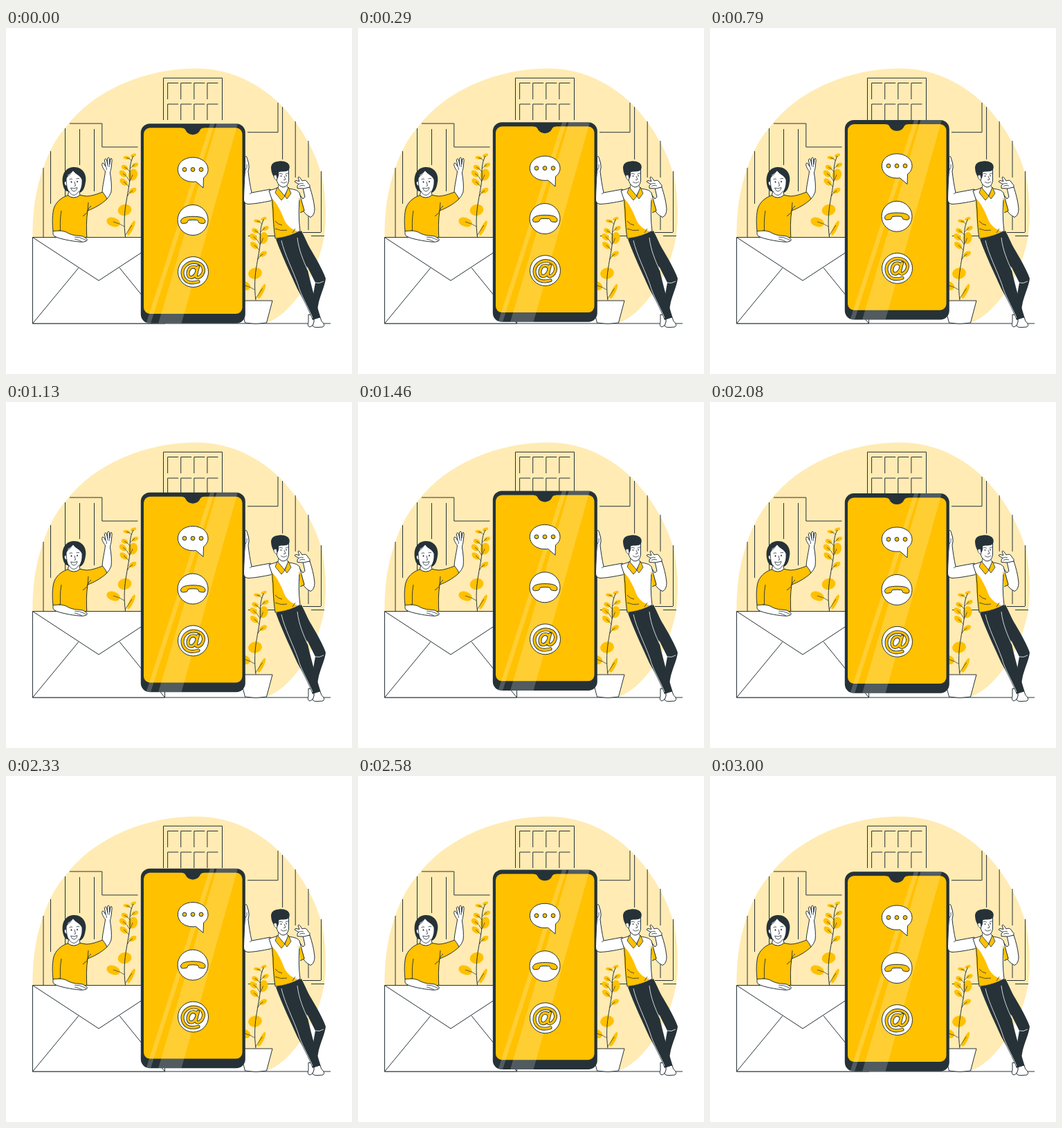
Recreate the animation shown at these times as an HTML page with a canvas. Size 500x500 px, loop 3.04 s.

```html
<!DOCTYPE html>
<html lang="en">
<head>
<meta charset="utf-8">
<title>Contact us</title>
<style>
html, body { margin: 0; width: 100%; height: 100%; overflow: hidden; background: #fff; }
canvas { display: block; width: 500px; height: 500px; }
</style>
</head>
<body>
<canvas id="stage"></canvas>
<script>
const INK = '#263238', SUN = '#ffc100', CREAM = '#ffebb3', WHITE = '#fff';
const SHINE = 'rgba(255,255,255,.2)';
const LOOP = 3040, RISE = 10, STEPS = 72, STEP = 3000 / STEPS;

const canvas = document.getElementById('stage');
const ctx = canvas.getContext('2d');
const ratio = window.devicePixelRatio || 1;
canvas.width = canvas.height = 500 * ratio;

function shape(d, fill, stroke, width = 1) {
  const path = new Path2D(d);
  if (fill) { ctx.fillStyle = fill; ctx.fill(path); }
  if (stroke) { ctx.strokeStyle = stroke; ctx.lineWidth = width; ctx.stroke(path); }
}
const line = (d, color = INK, width = 1) => shape(d, null, color, width);

function oval(x, y, rx, ry, fill, stroke, turn = 0) {
  ctx.beginPath();
  ctx.ellipse(x, y, rx, ry, turn * Math.PI / 180, 0, Math.PI * 2);
  ctx.fillStyle = fill;
  ctx.fill();
  if (stroke) { ctx.strokeStyle = stroke; ctx.lineWidth = 1; ctx.stroke(); }
}

function box(x, y, w, h, r, fill) {
  ctx.beginPath();
  ctx.roundRect(x, y, w, h, r);
  ctx.fillStyle = fill;
  ctx.fill();
}

function backdrop() {
  shape('M38.5 302C38 266 43 232 54 202C62 178 72 160 85 145C128 87 205 58.500 275 58.500C322 58.500 362 78 393 107C423 136 445 174 455.500 210C462 238 464 272 460 300C453 340 437 372 415 397C404 410 390 422 374 427L360 427L350 400L39 400Z', CREAM);
  line('M92 138H138.800V172H190.500M54 202V302M64.500 178V254M85.500 145V255M106.500 146V198M127.500 146V236');
  line('M393 108V150.700H349M399.600 114V190M418.200 135V216M437 163V216M437 270V292M455.500 207V295');
  line('M350 300.500H362M377 300.500H388M429 295.500H455M441 300.500H460');
  line('M227.500 133V72.300H312.500V133');
  for (const [top, bottom] of [[79.500, 103], [110, 133]]) {
    for (let i = 0; i < 4; i++) {
      const x = 233.600 + i * 19.100;
      line(`M${x} ${bottom}V${top}H${x + 15.500}`);
    }
  }
  line('M38 427H469');
}

function plant(dx, dy) {
  const leaves = [
    [171.5, 263, 10, 8, -15], [155, 280.5, 10, 6.5, 20], [181, 289, 3, 11.5, 26],
    [183.5, 212, 6.5, 8.5, 15], [169, 210.5, 6, 4, 40], [183, 235, 6, 3.6, -30],
    [170, 222.5, 6.5, 4, 40], [171.5, 201.5, 5, 3.4, 25], [186.5, 198, 5, 3, -25],
    [174.5, 187.5, 5, 2.2, 10], [184, 184, 4.2, 2.2, -20]
  ];
  ctx.save();
  ctx.translate(dx, dy);
  for (const [x, y, rx, ry, turn] of leaves) oval(x, y, rx, ry, SUN, null, turn);
  line('M172.5 302C170 283 171 266 174 250C176 236 180 222 179 208C179 198 181 191 184 185');
  line('M155 280Q166 283 171 287M183 235Q177 238 175.5 243M169 210Q175 214 178.5 221M183 212Q181 218 178.5 222M170 222Q175 226 178 230M186 197L179.5 203M171 201Q177 204 179 208M174 187.5Q179 188 181.5 192M182 285L172 300', INK, .7);
  ctx.restore();
}

function pot() {
  shape('M337 394H385L376.500 426Q361 429 345.500 426Z', WHITE, INK);
}

function woman() {
  // raised forearm and hand
  shape('M139 240C139 228 143 215 143.500 207C140 203 138 198 139 195.500Q140.500 194 142 197L144 200L142.300 190.500Q143.500 187.500 145.200 190L146.800 197L146.800 188Q148.500 186 149.500 188.500L149.700 197L151 189Q152.800 187.500 153.200 190.500L152.200 201C151.500 206 150.500 207 150.500 210C152 219 153 229 152 237Q150 243 145 248Z', WHITE, INK);
  line('M146.500 196L147 200M149.500 196L149 201M143 199Q146 202 145.500 205', INK, .8);
  // sweater
  shape('M89 242C80 245 71 252 68.500 263C66.500 273 67 284 68 294L79 296V306H117C116 291 116 277 118 264C126 261 138 255 146 247C144 243 142 240 139.500 237C132 240 123 243 116 243L107 241.500Z', SUN, INK);
  line('M80 264C78 275 78 286 79 298M118 264L119 252M117 266Q119 260 123 257M78 292Q75 295 69 294M111 272L117 267', INK, .9);
  // hair, neck and face
  shape('M84 232C80 223 79 203 97 201C112 200 118 214 114.500 225C113.500 231 111 237 106 238L92 236Q86 237 84 232Z', INK);
  shape('M91 234L89.500 242Q98 248.500 107 241.500L105 232Z', WHITE, INK);
  shape('M87.500 218C89 213 94 212 97 206.500C101 212 107 213 109.500 219C110.500 230 106 240 99 241.500C92 242 87 232 87.500 218Z', WHITE);
  line('M105 236Q102 241 99 241.500Q94 242 90.500 235', INK, .8);
  shape('M87 222C83.500 220 83.500 228 88 228Z', WHITE, INK, .7);
  oval(94.500, 222.500, .9, 1.2, INK);
  oval(103, 222, .9, 1.2, INK);
  line('M91.500 219Q94 217 96 218.500M101.500 218Q104 216.500 106 218M99 222L100.500 228L98.500 228.500', INK, .8);
  shape('M93.500 231Q98 233 103 230.500Q102 236 98 236Q95 236 93.500 231Z', WHITE, INK, .8);
  line('M97 207Q93 211 89 213', WHITE, .7);
}

function envelope() {
  shape('M38.500 302.500H229.500V427H38.500Z', WHITE, INK);
  line('M38.500 302.500L134 365L229.500 302.500M38.500 427L105 346.500M229.500 427L164 346.500');
}

function restingHand() {
  shape('M68 293.500C75 293 82 292.500 87 295C92 298 98 300 104 300Q112 300 116 304Q119 307 116 308Q112 310 106 309C95 308 78 305 70 301Q67 299 68 293.500Z', WHITE, INK);
  line('M99 302Q107 302 112 305L116 307M99 305Q105 306 110 309', INK, .8);
}

function atSign() {
  const d = 'M277.500 345L274.500 357Q274 361 278 360.500C283 359 286 353 285.500 348.500C284 341.500 278 338.500 271.500 338.500C262 338.500 255 345.500 255 353.500C255 362 261 368 269 368Q274 368 278 366.500M276 350C275 343.500 267 343.500 264 350C261.500 356 263.500 360.500 267.500 360.500C271.500 360.500 275.500 355 276 350Z';
  ctx.lineCap = 'round';
  line(d, INK, 5);
  line(d, SUN, 3.2);
  ctx.lineCap = 'butt';
}

function phone(dy) {
  ctx.save();
  ctx.translate(0, dy);
  box(194.800, 138.200, 151, 288.600, 13, INK);
  box(199, 144.300, 142.500, 268.700, 9, SUN);
  shape('M254 143H286V144.500C281 144.500 281 147 279 150C275 155.500 265 155.500 261 150C259 147 259 144.500 254 144.500Z', INK);

  ctx.save();
  ctx.beginPath();
  ctx.roundRect(194.800, 138.200, 151, 288.600, 13);
  ctx.clip();
  shape('M304.500 138H335L253.500 427H220Z', SHINE);
  shape('M295 138H301.500L209 427H202.500Z', SHINE);
  ctx.restore();

  shape('M270 187C282.500 187 292 194.500 292 204.500C292 209.500 289.500 213.500 285.500 216.500L285 231L274.500 222Q272 222.300 270 222.300C257.500 222.300 248.300 214.500 248.300 204.500C248.300 194.500 257.500 187 270 187Z', WHITE, INK);
  for (const x of [258, 270, 282]) oval(x, 204.500, 2.900, 2.900, SUN, INK);

  oval(270, 277.500, 22, 22, WHITE, INK);
  shape('M252.500 279.500C252.500 274 261 272.300 270 272.300C280 272.300 288 274 288 279.500Q288 282.500 285 282.500L280.500 282Q278 281.700 278 279.500Q278 278 275.500 277.600Q270 277 265 277.600Q262.500 278 262.500 279.500Q262.500 281.700 260 282L255.500 282.500Q252.500 282.500 252.500 279.500Z', SUN, INK);

  oval(270.500, 352.500, 22, 22, WHITE, INK);
  atSign();
  ctx.restore();
}

function man() {
  // hand and arm against the handset
  shape('M345.500 186Q347 184 348 187L350.500 195Q352 201 350 207C351 217 353 229 355 238L382 233L386 249C376 251 362 254 350 254.500Q343 254 343.500 246C344 232 344.500 218 345.500 206Z', WHITE, INK);
  line('M346 205Q349 202 348 197M355 238L352 240', INK, .8);

  // shoes
  shape('M437 414L437 425Q435 431 439 432Q443 431 445 427L447 416Z', WHITE, INK);
  shape('M445 420Q446 425 443 430Q444 433 451 432.500L458 432Q461 430 459 427Q455 424 454 418Z', WHITE, INK);

  // trousers, far leg first
  shape('M418 297L427 293C433 305 437 315 441 321C448 333 458 350 462 362C461 372 455 384 452 396L449 412L441 414L443 398L444 385L447 368L436 346L425 335Z', INK);
  shape('M390 305L424 293C426 312 431 332 436 350C441 372 448 397 454.500 418L443 422C438 409 429 391 421 377C412 357 399 330 390 305Z', INK);
  line('M398 307C402 326 415 351 422 371C426 386 436 402 443 419', WHITE, .8);
  line('M421 303C423 321 430 337 436 350M447 368Q453 370 459 366', WHITE, .8);

  // bent arm
  shape('M421 236L429 247L432 244L429 231L439 230C442 239 445 250 446 261Q446 271 440 273.500Q434 271 429 264L420 251Z', WHITE, INK);
  shape('M421 231.500Q420 227.500 423 225.500L417.500 222.500Q417 220.500 419 220.500L424 221.500L422 216Q423 214 425 216.500L428 221Q433 219 435 222L437 225Q440 227 439 230L430 232Z', WHITE, INK);
  line('M423 225.500Q427 223.500 430 225M424 228.500Q428 226.500 432 228', INK, .8);

  // shirt
  shape('M380 235L393 231L408 232C416 233 421 234 424 238L431 264L423 267C423 276 424 285 425 293C415 299 402 303 389 304C387 291 386 276 386 263Q385 256 385 250Z', WHITE);
  shape('M383 245C392 253 398 266 402 277C406 286 413 291 422 294C411 300 400 303 389 304C386 288 385 268 383 245Z', SUN);
  shape('M423 245L427 249L432 264L425 267Z', SUN);
  line('M380 235L393 231M408 232C416 233 421 234 424 238L431 264L425 267M424 249C423 263 423 279 425 293C415 299 402 303 389 304C387 291 386 276 386 263Q385 256 385 250L380 235');
  line('M389 290Q398 294 406 292M389 279Q393 284 399 285M414 296L418 290', INK, .8);

  // neck and collar
  shape('M394 225L393 233L402 243L408 232L405 226Z', WHITE, INK, .8);
  shape('M392 230L389 238L398 249L403 243ZM408 230L412 239L406 247L403 243Z', SUN, INK, .8);

  // head
  shape('M390 206C389 218 392 228 400 230Q407 230 408.500 221L408.500 204Z', WHITE, INK);
  shape('M391 220C387 216 383.500 210 383.200 204C382 197 387 193.500 392 193C400 190.500 409 194 409.500 199C410.500 204 408 206.500 405 207C401 208 397 206.500 394 208.500C395 213 393 217 391 220Z', INK);
  shape('M391 213Q387 211 387 215Q388 219.500 392 219.500Z', WHITE, INK, .7);
  oval(397.500, 214, .8, 1.1, INK);
  oval(405, 213.500, .8, 1.1, INK);
  line('M395 210.500Q397 209.500 400 211.500M403.500 211.500Q405 209.500 408 210M402 214L404 219L401 219.500M397 222Q401 226 406 222', INK, .8);
}

// Step index at the given time, with clock ticks of 10 ms.
function stepAt(t) {
  const tick = Math.floor(t / 10) * 10 + 10;
  return Math.min(STEPS, Math.ceil(tick / STEP - 1e-6) - 1);
}

function draw(t) {
  const half = STEPS / 2;
  const lift = 1 - Math.abs(stepAt(t) - half) / half;
  ctx.setTransform(ratio, 0, 0, ratio, 0, 0);
  ctx.lineJoin = 'round';
  ctx.fillStyle = WHITE;
  ctx.fillRect(0, 0, 500, 500);
  backdrop();
  woman();
  plant(0, 0);
  plant(188.500, 91.500);
  pot();
  envelope();
  restingHand();
  phone(-RISE * lift);
  man();
}

const start = performance.now();
function frame() {
  draw((performance.now() - start) % LOOP);
  requestAnimationFrame(frame);
}
frame();
</script>
</body>
</html>
```
